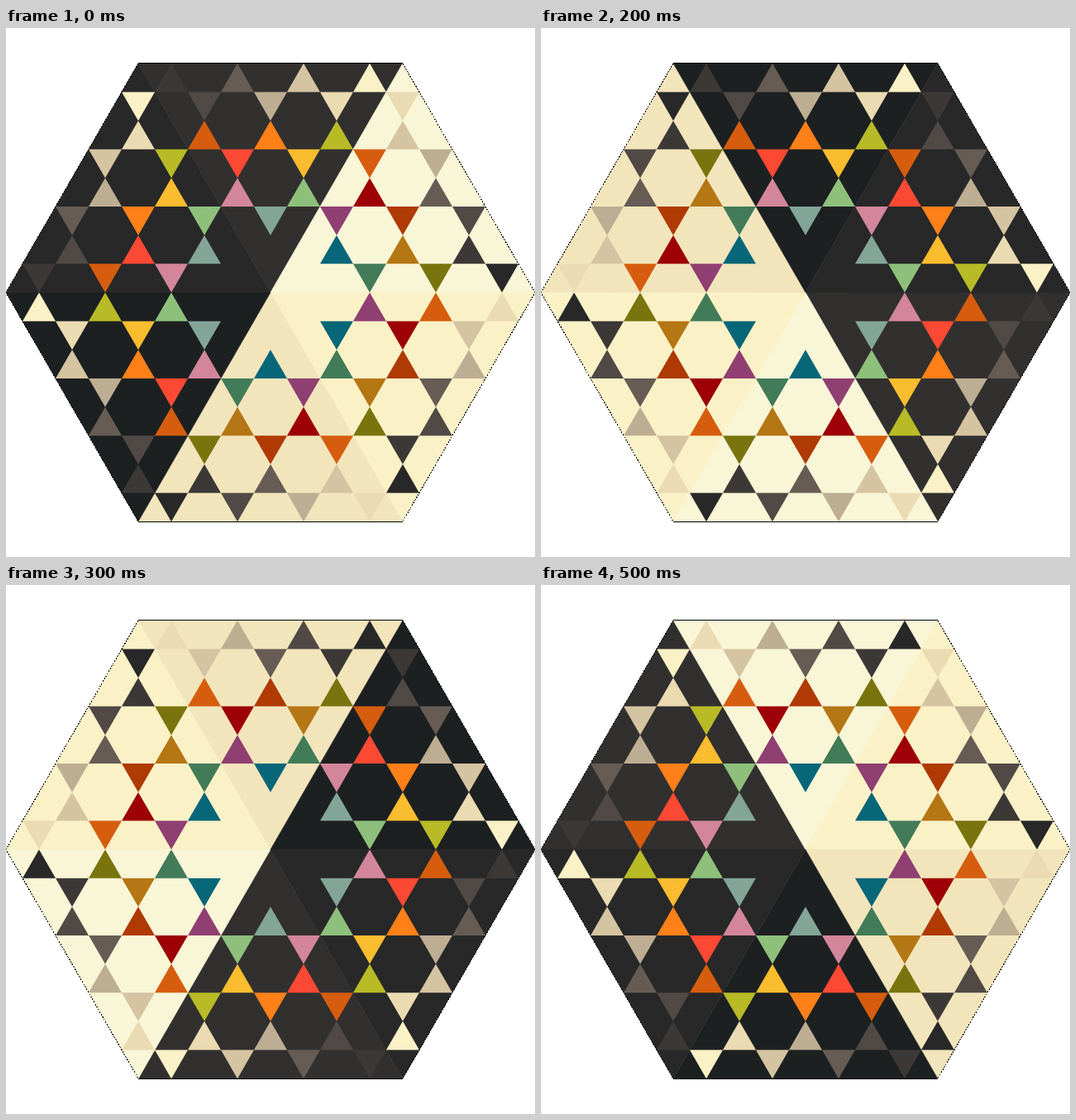
Write an HTML page that moves like this. It is 640x640 px and loops after 600 ms.

```html
<!DOCTYPE html>
<html lang="en">
<head>
<meta charset="utf-8">
<title>Turning hexagon</title>
<style>
html, body { margin: 0; height: 100%; overflow: hidden; background: #fff; }
svg { display: block; width: 100%; height: 100%; }
</style>
</head>
<body>
<svg viewBox="0 0 640 640">
  <g id="wheel"></g>
  <g fill="none" stroke="#000" shape-rendering="crispEdges">
    <path d="M160 42.5H480M160 597.5H480"/>
    <path stroke-dasharray="2 1.5" d="M160 42.9L0 320L160 597.1M480 42.9L640 320L480 597.1"/>
  </g>
</svg>
<script>
const SIDE = 40, H = SIDE * Math.sqrt(3) / 2, STEP = 100;

// Rings from the rim inwards, each listed clockwise
const dark = [
  ['#3c3836', '#504945', '#665c54', '#bdae93', '#d5c4a1', '#ebdbb2', '#fbf1c7'],
  ['#d65d0e', '#fb4934', '#fe8019', '#fabd2f', '#b8bb26'],
  ['#d3869b', '#83a598', '#8ec07c']
];
const light = [
  ['#ebdbb2', '#d5c4a1', '#bdae93', '#665c54', '#504945', '#3c3836', '#282828'],
  ['#d65d0e', '#9d0006', '#af3a03', '#b57614', '#79740e'],
  ['#8f3f71', '#076678', '#427b58']
];
const sectors = [
  ['#32302f', dark], ['#f9f5d7', light], ['#fbf1c7', light],
  ['#f2e5bc', light], ['#1d2021', dark], ['#282828', dark]
];

const triangle = (x, base, apex, half, fill, extra = '') =>
  `<path d="M${x - half} ${base}H${x + half}L${x} ${apex}Z" fill="${fill}" ${extra}/>`;

function sector([ground, rings], index) {
  let parts = triangle(0, -8 * H, 0, 8 * SIDE / 2, ground, `stroke="${ground}" stroke-width=".5"`);
  for (const ring of rings) {
    const n = ring.length;
    ring.forEach((color, i) => {
      const x = (i - (n - 1) / 2) * SIDE;
      const apex = i % 2 ? n - 1 : n + 1;
      parts += triangle(x, -n * H, -apex * H, SIDE / 2, color);
    });
  }
  return `<g transform="rotate(${index * 60})">${parts}</g>`;
}

const wheel = document.getElementById('wheel');
wheel.innerHTML = sectors.map(sector).join('');

const start = performance.now();
function draw(now) {
  const turn = Math.floor(Math.max(0, now - start) / STEP) % 6;
  wheel.setAttribute('transform', `translate(320 320) rotate(${turn * 60})`);
  requestAnimationFrame(draw);
}
draw(start);
</script>
</body>
</html>
```
